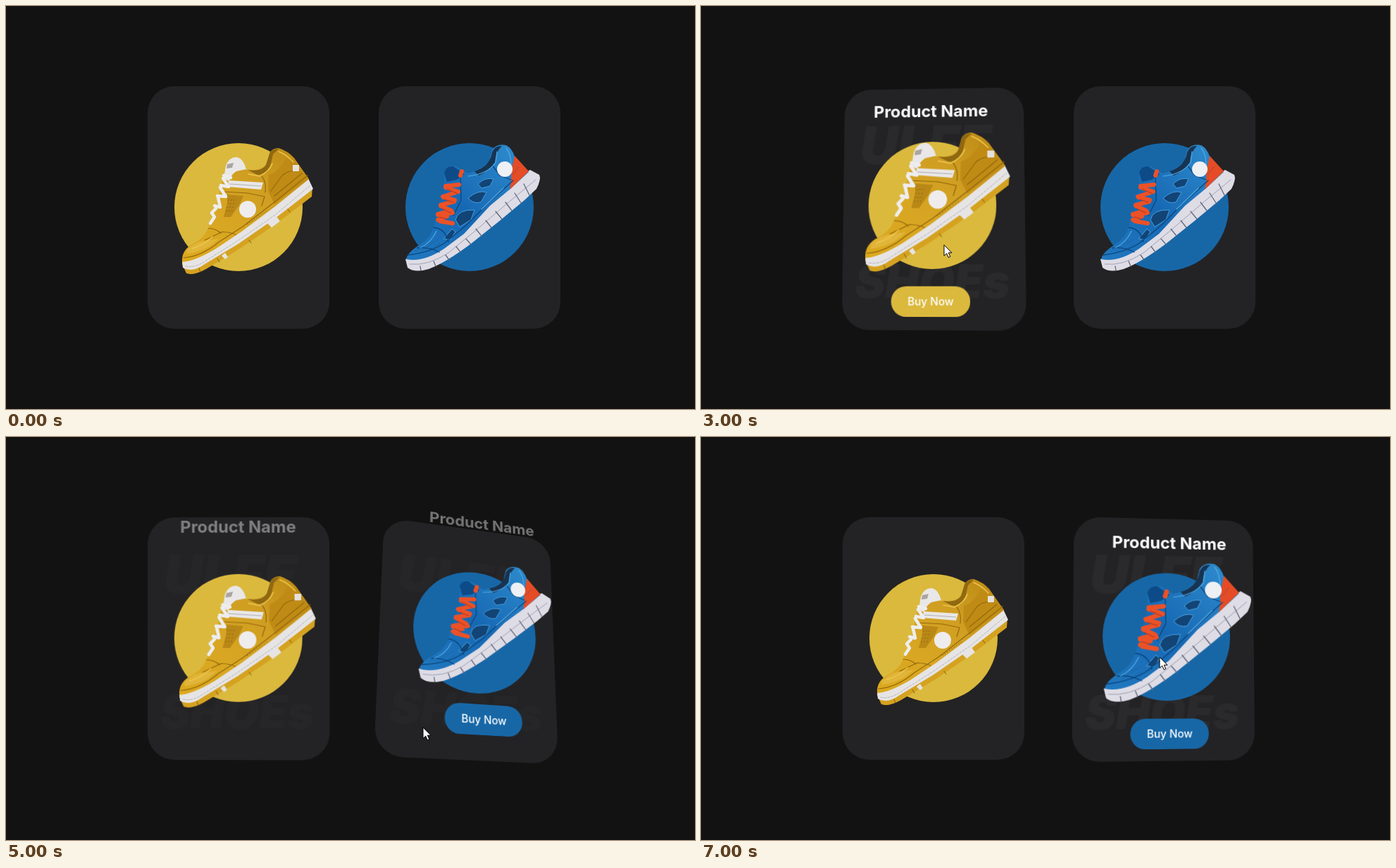
Animation, 978 px wide and 573 px high, one loop 7.2 s. Source, as an HTML page:

```html
<!DOCTYPE html>
<html lang="en">
<head>
<meta charset="utf-8">
<title>Tilting product cards</title>
<style>
html, body { margin: 0; width: 100%; height: 100%; overflow: hidden; background: #121213; }
body { position: relative; font-family: Inter, "Open Sans", sans-serif; }
.card { position: absolute; top: 114px; width: 258px; height: 345px; border-radius: 38px; background: #232325; transform-style: preserve-3d; }
.card > * { position: absolute; }
.ghost { inset: 0; color: #fff; font-weight: 900; font-style: italic; }
.ghost span { position: absolute; left: 23px; line-height: 60px; white-space: nowrap; }
.brand { top: 51px; font-size: 76px; }
.kind { top: 247px; font-size: 64px; margin-left: -5px; }
.circle { left: 38px; top: 81px; width: 182px; height: 182px; border-radius: 50%; transform: translateZ(31px) scale(.969); }
.shoe { inset: 0; width: 258px; height: 345px; overflow: visible; }
.title { left: 0; top: 152.5px; width: 100%; height: 40px; line-height: 40px; text-align: center; color: #fff; font-size: 22.2px; font-weight: 700; white-space: nowrap; }
.buy { left: 77px; top: 282.5px; width: 104px; height: 40px; line-height: 40px; border-radius: 20px; text-align: center; color: #fff; font-size: 14.2px; font-weight: 500; white-space: nowrap; transform: translateZ(65px); }
.pointer { position: absolute; left: 0; top: 0; width: 24px; height: 26px; overflow: visible; }
</style>
</head>
<body>
<script>
const LOOP = 7200, STEP = 200, MAX_TILT = 25, TILT_LAG = 100;
const CARD = { top: 114, width: 258, height: 345 };

const yellowShoe = `
  <defs><linearGradient id="gold" x1="0" y1="1" x2="1" y2="0">
    <stop offset="0" stop-color="#dca91d"/><stop offset=".35" stop-color="#d8a622"/>
    <stop offset=".65" stop-color="#cf9e22"/><stop offset="1" stop-color="#b98712"/>
  </linearGradient></defs>
  <path fill="#d5a220" d="M250 367L256 380Q266 384 284 374L332 345L383 310L434 271L435 258L250 364Z"/>
  <path fill="#e6e4e4" d="M250 362L251 372Q264 380 282 367L330 338L382 302L436 260L429 245L300 335Z"/>
  <path fill="#e6e4e4" d="M370 308L383 298L389 306L377 315ZM306 355L311 351L315 357L311 360Z"/>
  <path fill="url(#gold)" d="M250 364Q249 349 262 340Q280 332 287 316L297 290L307 249Q322 228 341 233Q364 235 370 224L374 209Q378 202 387 202Q400 206 409 216L430 246L382 285L334 321L298 345Q268 363 250 364Z"/>
  <path fill="#8f6811" d="M343 233Q363 236 369 226L375 207Q380 203 387 203L379 211L376 224Q371 239 357 240Z"/>
  <path fill="#c08b15" d="M373 240Q388 235 397 217Q407 214 412 225L428 245L381 282L372 263Z"/>
  <path fill="#e0b53a" d="M257 346Q272 333 287 333L302 331L289 342Q271 351 257 352Z"/>
  <path fill="#b98816" d="M314 268L337 270L331 283L319 300L309 300L314 281Z"/>
  <g fill="none" stroke-linecap="round" stroke-linejoin="round">
    <path stroke="#94690c" stroke-width="1.2" d="M252 358Q278 356 303 335L337 313L382 278L428 241M282 333L307 321Q320 322 326 325M307 264L343 266L367 271L363 284M360 239Q370 247 368 265M376 263L392 241Q402 232 416 235M381 270L420 238M287 316Q297 316 305 323"/>
    <path stroke="#edc64c" stroke-width="1.5" d="M264 345Q281 340 293 328M344 239L360 242Q374 235 378 224M387 207Q398 211 408 222"/>
    <path stroke="#7f5c10" stroke-width="1.3" stroke-dasharray="0 4" d="M316 276L328 276M315 281L326 281M314 286L324 286M313 291L322 291M343 310L372 290"/>
    <path stroke="#aaa9ab" stroke-width=".8" stroke-dasharray="3 2" d="M255 370Q268 373 284 362L330 333L382 297L432 255"/>
    <path stroke="#81600d" stroke-width="1" d="M274 373L276 378M300 359L303 364M345 333L348 337M400 289L403 293"/>
  </g>
  <path fill="#e9e7e7" d="M309 246L312 227Q317 214 328 215Q337 217 341 232L327 235Q319 240 317 249Z"/>
  <path fill="#aaa5a0" d="M314 225L323 223L321 230L313 231Z"/>
  <path fill="#e9e7e7" d="M316 248L365 251L362 261L315 257Z"/>
  <path fill="none" stroke="#b0afb2" stroke-width="1" d="M317 253L362 256"/>
  <path fill="none" stroke="#eeedee" stroke-width="4.5" stroke-linecap="round" stroke-linejoin="round" d="M309 241L319 244M305 255L316 257L308 245M300 270L312 271L304 258M296 284L304 286L301 272M290 309L296 300L292 294L298 288"/>
  <circle cx="343" cy="289" r="12" fill="#eeeced"/>
  <rect x="407" y="226" width="9" height="9" fill="#e5e1dc"/>`;

const blueShoe = `
  <defs><linearGradient id="azure" x1="0" y1="1" x2="1" y2="0">
    <stop offset="0" stop-color="#2079c0"/><stop offset=".45" stop-color="#1768b3"/>
    <stop offset="1" stop-color="#308fd0"/>
  </linearGradient></defs>
  <path fill="#dedce5" d="M567 360L570 372Q580 380 600 374Q624 365 660 338L700 306L736 276L753 260Q760 246 757 240L744 233L680 270L620 340Z"/>
  <path fill="url(#azure)" d="M568 360Q570 350 588 339Q602 331 607 314L615 290L622 256L622 237Q626 225 638 228L655 238Q672 235 686 221L690 205Q696 195 710 198Q718 202 722 214L742 236L716 260L687 284L650 324L622 345Q592 365 568 360Z"/>
  <path fill="#e54b25" d="M722 213L742 235L715 261Q718 248 717 236Z"/>
  <path fill="#173452" d="M665 235Q687 228 690 208Q694 198 704 199Q695 207 694 222Q685 235 671 241Z"/>
  <path fill="#0c4b88" d="M622 237Q625 227 635 228L651 239L640 247L626 250Z"/>
  <g fill="#124476" stroke="#44a0df" stroke-width="1">
    <path d="M670 253Q680 243 692 246L687 256L675 259Z"/>
    <path d="M656 273Q670 261 682 265L674 279Q663 282 656 273Z"/>
    <path d="M638 304Q641 289 665 290L660 304L644 314Z"/>
    <path d="M621 331L633 317L638 321L631 332Z"/>
  </g>
  <g fill="none" stroke-linecap="round" stroke-linejoin="round">
    <path stroke="#0b467e" stroke-width="1.3" d="M571 354Q604 350 624 336L653 312L687 278L720 248M584 344Q600 342 615 350M607 315Q623 316 628 335M645 244L646 276L635 298M690 226L701 241L717 247"/>
    <path stroke="#52a9e1" stroke-width="1.2" d="M588 344Q603 337 611 320M656 242Q683 239 695 223L697 207M710 202Q718 211 717 234M675 289L706 259"/>
    <path stroke="#104b82" stroke-width="1" stroke-dasharray="0 3" d="M582 348L607 334M590 348L613 332M600 348L616 337M625 233L642 239M626 238L638 242M720 239L729 227"/>
    <path stroke="#9fa1b4" stroke-width="1" d="M573 367Q599 370 628 351L668 318L711 281L752 247"/>
    <path stroke="#62687e" stroke-width="1.3" d="M588 370L589 376M607 363L610 370M624 354L629 361M639 342L645 350M653 331L660 339M667 317L675 327M681 305L689 315M695 292L704 303M709 279L718 291M722 266L731 280M735 253L743 269"/>
    <path stroke="#ec5127" stroke-width="6" d="M647 235L645 241M624 256L643 254M624 258L642 264L620 271M621 272L637 276M617 283L636 278M617 284L632 291L613 296M613 297L634 294M613 304L626 299M616 306L634 309"/>
    <path stroke="#a83821" stroke-width="1" d="M626 260L641 267M622 275L635 279M618 288L631 294M615 300L626 303"/>
  </g>
  <circle cx="708" cy="232" r="11" fill="#edf0f5"/>`;

// Hover starts and ends at the given times; x is the left edge on the stage.
const cards = [
  { x: 201, color: "#dbb93d", shoe: yellowShoe, enter: 600, leave: 4780 },
  { x: 529, color: "#1767a7", shoe: blueShoe, enter: 4850, leave: LOOP }
];

// time, x, y
const pointerPath = [
  [200, 4, 4], [600, 203, 236], [800, 235, 285], [1200, 266, 320], [1400, 271, 321],
  [2000, 306, 313], [2200, 326, 315], [2800, 350, 312], [3400, 335, 395], [3800, 336, 403],
  [4400, 345, 406], [4600, 412, 420], [4800, 470, 428], [4900, 560, 432], [5000, 592, 413],
  [5300, 612, 380], [5600, 688, 322], [5800, 670, 306], [6000, 647, 300],
  [6400, 582, 302], [6600, 585, 312], [6800, 602, 316], [7000, 651, 313]
];

const clamp = v => Math.max(0, Math.min(1, v));
const easeOut = (v, power) => 1 - (1 - clamp(v)) ** power;

function pointerAt(time) {
  const next = pointerPath.findIndex(key => key[0] > time);
  if (next === 0) return pointerPath[0].slice(1);
  if (next < 0) return pointerPath.at(-1).slice(1);
  const a = pointerPath[next - 1], b = pointerPath[next];
  const u = (time - a[0]) / (b[0] - a[0]);
  return [1, 2].map(i => a[i] + (b[i] - a[i]) * u);
}

function hoverAmount({ enter, leave }, time, duration, power) {
  return time < leave
    ? easeOut((time - enter) / duration, power)
    : 1 - easeOut((time - leave) / duration, power);
}

function buildCard(card) {
  const root = document.createElement("div");
  root.className = "card";
  root.style.left = card.x + "px";
  root.innerHTML = `
    <div class="ghost"><span class="brand">ULFE</span><span class="kind">SHOEs</span></div>
    <div class="circle" style="background:${card.color}"></div>
    <div class="title">Product Name</div>
    <div class="buy" style="background:${card.color}">Buy Now</div>
    <svg class="shoe" viewBox="${card.x} ${CARD.top} ${CARD.width} ${CARD.height}">${card.shoe}</svg>`;
  document.body.append(root);
  card.root = root;
  for (const part of ["ghost", "title", "buy", "shoe"]) card[part] = root.querySelector("." + part);
}

function drawCard(card, time) {
  const [px, py] = pointerAt(time - TILT_LAG);
  const fx = clamp((px - card.x) / CARD.width);
  const fy = clamp((py - CARD.top) / CARD.height);
  const tilt = MAX_TILT * hoverAmount(card, time, 300, 3);
  const shown = hoverAmount(card, time, 500, 1.5);
  const hovered = time >= card.enter && time < card.leave;

  card.root.style.transform =
    `perspective(1000px) rotateX(${(2 * fy - 1) * tilt}deg) rotateY(${(1 - 2 * fx) * tilt}deg)`;
  card.ghost.style.opacity = shown * 0.035;
  card.title.style.opacity = shown;
  card.title.style.transform = `translate3d(0, ${-166.5 + 42 * shown}px, 65px)`;
  card.buy.style.visibility = hovered ? "visible" : "hidden";
  card.shoe.style.transform = `translateZ(${32 + 92 * shown}px) scale(.968)`;
}

cards.forEach(buildCard);
document.body.insertAdjacentHTML("beforeend", `
  <svg class="pointer" fill="#fff" stroke="#000" stroke-width="1" stroke-linejoin="round">
    <path id="arrow" d="M0 0V15.5L3.7 12.2L6.2 17.8L8.8 16.6L6.3 11.2H11Z"/>
    <path id="hand" d="M-2 1Q0-1 2 1V8Q4 6 5 8Q7 7 8 9Q10 8 11 11V15L8 20H0L-6 12Q-6 9-4 10L-2 12Z"/>
  </svg>`);
const pointer = document.querySelector(".pointer");
const arrow = document.getElementById("arrow");
const hand = document.getElementById("hand");

function drawPointer(time) {
  const [x, y] = pointerAt(time);
  const onButton = time < cards[0].leave && Math.abs(x - 329) < 57 && Math.abs(y - 403) < 21;
  pointer.style.visibility = time < pointerPath[0][0] ? "hidden" : "visible";
  pointer.style.transform = `translate(${x}px, ${y}px)`;
  arrow.style.display = onButton ? "none" : "inline";
  hand.style.display = onButton ? "inline" : "none";
}

function render(now) {
  const time = Math.floor((now % LOOP) / STEP) * STEP;
  cards.forEach(card => drawCard(card, time));
  drawPointer(time);
}

const start = performance.now();
function tick() {
  render(performance.now() - start);
  requestAnimationFrame(tick);
}
tick();
</script>
</body>
</html>
```
